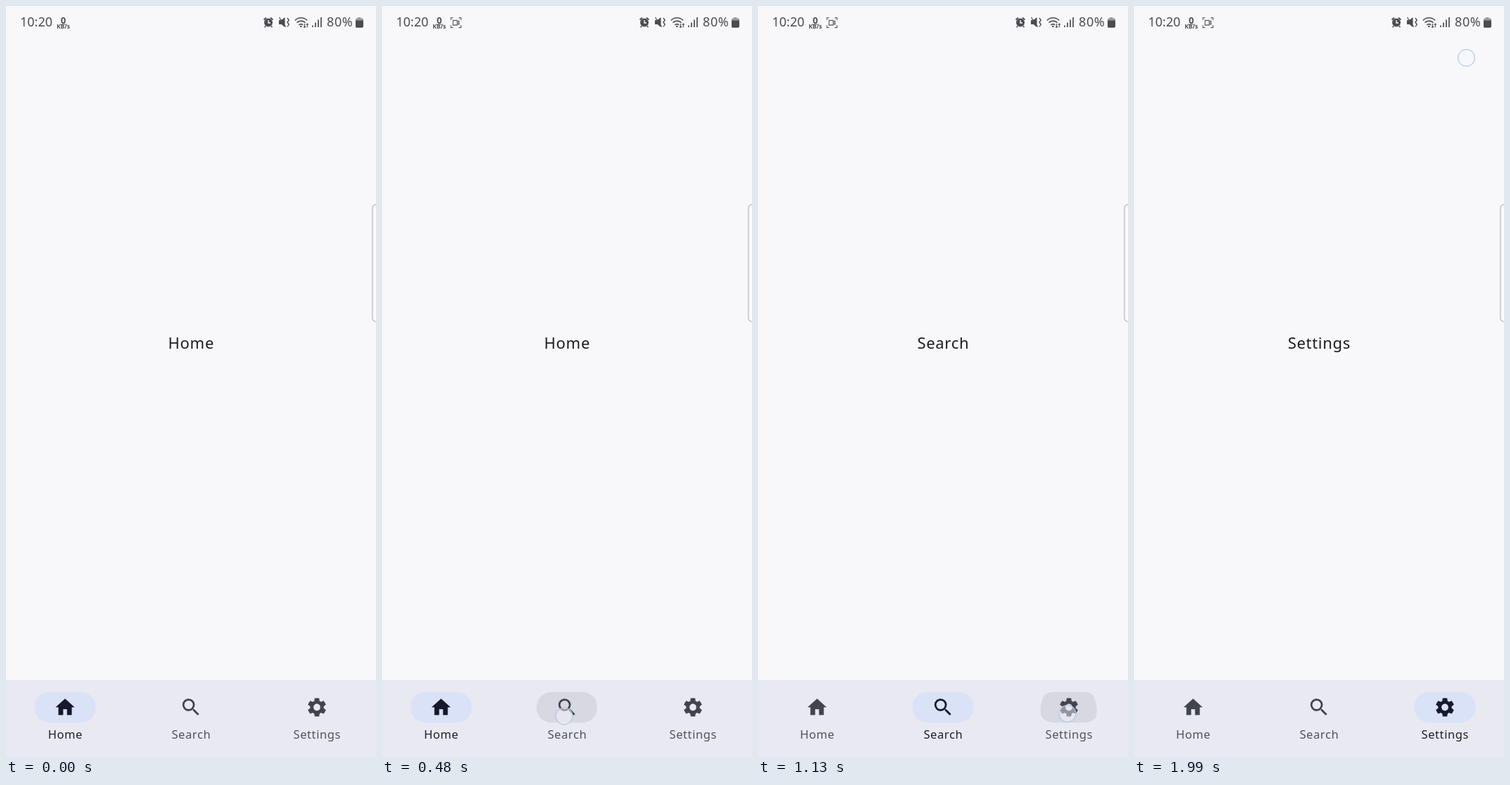
Recreate the animation shown at these times as an HTML page. Size 526 by 1065 pixels, loop 2.47 s.

```html
<!DOCTYPE html>
<html lang="en">
<head>
<meta charset="utf-8">
<title>Bottom navigation</title>
<style>
  html, body { margin: 0; width: 100%; height: 100%; overflow: hidden; background: #f8f8fb; }
  svg { display: block; width: 100vw; height: 100vh; }
  text { font-family: "Noto Sans", "Open Sans", sans-serif; }
  .title { font-size: 22px; letter-spacing: .7px; text-anchor: middle; fill: #1b1b21; }
  .label { font-size: 16.5px; font-weight: 500; letter-spacing: .6px; text-anchor: middle; }
  .status { fill: #4b4b53; }
  .line { fill: none; stroke: #4b4b53; }
</style>
</head>
<body>
<svg viewBox="0 0 526 1065">
  <defs>
    <path id="home" d="M10 20v-6h4v6h5v-8h3L12 3 2 12h3v8z"/>
    <g id="search">
      <circle cx="9.5" cy="9.5" r="5.5" fill="none" stroke="currentColor" stroke-width="2"/>
      <path d="M15.5 14h-.8l-1-1-.8.8 1.1 1v.7l5 5 1.5-1.5z"/>
    </g>
    <path id="tooth" d="M-1.9 -9.6H1.9Q2.3 -9.6 2.4 -9.2L2.8 -6.6H-2.8L-2.4 -9.2Q-2.3 -9.6 -1.9 -9.6z"/>
    <g id="settings" transform="translate(12 12)">
      <circle r="5.4" fill="none" stroke="currentColor" stroke-width="3.6"/>
    </g>
  </defs>
  <rect width="526" height="1065" fill="#f8f8fb"/>

  <g class="status">
    <text x="20" y="29" font-size="18">10:20</text>
    <text x="81.5" y="25" font-size="13" font-weight="700" text-anchor="middle">0</text>
    <path class="line" d="M77 26h9.5" stroke-width=".8"/>
    <text x="81.5" y="32.3" font-size="8.5" font-weight="700" text-anchor="middle">KB/s</text>
    <g id="rec" fill="none" stroke="#686870" stroke-width="1.3">
      <path d="M98 20v-3.3h3.3M109 16.7h3.3V20M112.3 27.3v3.3H109M101.3 30.6H98v-3.3"/>
      <path d="M101 20.5h6v6.5h-6zM107 23l2.5-1.5v4.5L107 24.5"/>
    </g>
    <circle cx="373" cy="23.5" r="6"/>
    <path class="line" d="M366.5 19.5l3.5-3M379.5 19.5l-3.5-3M369 28.5l-1.5 1.7M377 28.5l1.5 1.7" stroke-width="1.7"/>
    <path d="M373 20v4h3" fill="none" stroke="#f8f8fb" stroke-width="1.4"/>
    <path d="M388 20h3.5l5-4v14l-5-4H388z"/>
    <path class="line" d="M388.5 16l9 13.5" stroke-width="1.3"/>
    <path class="line" d="M400 17l2.2 3-2.2 3 2.2 3-2.2 3.5" stroke-width="1.4"/>
    <path class="line" d="M411 20.3a12 12 0 0 1 17 0M413.5 23.7a8.5 8.5 0 0 1 12 0M416.3 26.8a4.6 4.6 0 0 1 6 0" stroke-width="1.7"/>
    <circle cx="419.3" cy="29" r="1.3"/>
    <path class="line" d="M424.5 25v5.5M423 28.8l1.5 1.7 1.5-1.7M428.3 30.5V25M426.8 26.7l1.5-1.7 1.5 1.7" stroke-width="1.1"/>
    <path class="line" d="M436 27.5V30M440 23.5V30M444 19.5V30M448 16V30" stroke-width="1.7"/>
    <text x="456" y="29" font-size="18" letter-spacing=".6">80%</text>
    <path d="M500 16h4.5v1.5h2q1.5 0 1.5 1.5v2.5H497V19q0-1.5 1.5-1.5h1.5z" fill="#9a9aa2"/>
    <path d="M497 20.5h11V29q0 1.7-1.7 1.7h-7.6q-1.7 0-1.7-1.7z"/>
  </g>

  <rect x="521" y="281.5" width="20" height="166" rx="5" fill="#fbfbfd" stroke="#c3c2cf" stroke-width="1.5"/>
  <text class="title" id="title" x="263.3" y="486"></text>

  <rect y="956" width="526" height="109" fill="#e8e9f1"/>
  <g id="nav"></g>
  <circle id="touch" r="11.8" fill="#f6f9ff" fill-opacity=".45" stroke="#b4c8e6" stroke-width="1.3"/>
</svg>
<script>
const NS = "http://www.w3.org/2000/svg";
const LOOP = 2470, PILL_W = 87, PILL_H = 43.5, MID_Y = 994.5, ICON = 1.36;
const STEPS = [0, 50, 110, 160, 220, 270, 330, 380, 430, 490, 540, 590,
  1020, 1080, 1130, 1190, 1240, 1290, 1350, 1400, 1460, 1510, 1990];
const TABS = [["Home", 84], ["Search", 263], ["Settings", 442]];
// tap: tab, touch point, finger down, ripple start, selection, finger up
const TAPS = [
  { tab: 1, x: 259, y: 1007, down: 310, ripple: 320, select: 455, up: 500 },
  { tab: 2, x: 440, y: 1003.5, down: 1010, ripple: 1040, select: 1190, up: 1290 }
];
const byId = id => document.getElementById(id);
const clamp = v => Math.max(0, Math.min(1, v));
const ramp = (t, start, length) => clamp((t - start) / length);
const mix = (a, b, k) => a + (b - a) * k;
const mixColor = (a, b, k) => `rgb(${a.map((v, i) => Math.round(mix(v, b[i], k)))})`;

function add(parent, tag, attrs) {
  const el = document.createElementNS(NS, tag);
  set(el, attrs);
  parent.appendChild(el);
  return el;
}
function set(el, attrs) {
  for (const key in attrs) el.setAttribute(key, attrs[key]);
}

// cubic-bezier(.4, 0, .2, 1), solved by bisection
function ease(x) {
  let lo = 0, hi = 1;
  for (let i = 0; i < 20; i++) {
    const s = (lo + hi) / 2, r = 1 - s;
    if (1.2 * r * r * s + .6 * r * s * s + s ** 3 < x) lo = s; else hi = s;
  }
  return lo * lo * (3 - 2 * lo);
}

for (let i = 0; i < 6; i++)
  add(byId("settings"), "use", { href: "#tooth", transform: `rotate(${i * 60})` });

const nav = byId("nav");
const tabs = TABS.map(([name, x]) => {
  const top = MID_Y - PILL_H / 2;
  const clip = add(nav, "clipPath", { id: "clip" + name });
  add(clip, "rect", { x: x - PILL_W / 2, y: top, width: PILL_W, height: PILL_H, rx: PILL_H / 2 });
  const pill = add(nav, "rect", { y: top, height: PILL_H, rx: PILL_H / 2, fill: "#dae2f8" });
  const ripple = add(add(nav, "g", { "clip-path": `url(#clip${name})` }), "circle", { fill: "#44464f" });
  const icon = add(nav, "use", {
    href: "#" + name.toLowerCase(),
    transform: `translate(${x - 12 * ICON} ${MID_Y - 12 * ICON}) scale(${ICON})`,
    fill: "currentColor"
  });
  const label = add(nav, "text", { class: "label", x: x + .3, y: 1039 });
  label.textContent = name;
  return { x, pill, ripple, icon, label };
});

function selection(i, t) {
  const [a, b] = TAPS.map(tap => ease(ramp(t, tap.select, 100)));
  return [1 - a, a * (1 - b), b][i];
}

function drawTab(tab, i, t) {
  const k = selection(i, t), width = PILL_W * k;
  set(tab.pill, { x: tab.x - width / 2, width, opacity: k });
  set(tab.icon, { color: mixColor([66, 68, 77], [21, 25, 43], k) });
  set(tab.label, { fill: mixColor([80, 81, 91], [30, 31, 40], k) });

  const tap = TAPS.find(p => p.tab === i);
  if (!tap) return set(tab.ripple, { opacity: 0 });
  const grow = ease(ramp(t, tap.ripple, 225));
  set(tab.ripple, {
    cx: mix(tap.x + 1, tab.x, grow),
    cy: mix(tap.y, MID_Y, grow),
    r: mix(26, 49, grow),
    opacity: .1 * ramp(t, tap.ripple, 60) * (1 - ramp(t, tap.select, 50))
  });
}

function drawTouch(t) {
  const tap = TAPS.find(p => t >= p.down && t < p.up + 60);
  const touch = byId("touch");
  if (tap) set(touch, { cx: tap.x, cy: tap.y, opacity: 1 - ramp(t, tap.up, 60) });
  else set(touch, { cx: 472.5, cy: 73.5, opacity: t >= 1990 ? 1 : 0 });
}

function draw(now) {
  const time = now % LOOP;
  const t = STEPS.filter(s => s <= time).pop();
  const current = TAPS.filter(p => t >= p.select).length;
  byId("title").textContent = TABS[current][0];
  byId("rec").setAttribute("opacity", ramp(t, 50, 250));
  tabs.forEach((tab, i) => drawTab(tab, i, t));
  drawTouch(t);
}

const start = performance.now();
function tick() {
  draw(performance.now() - start);
  requestAnimationFrame(tick);
}
tick();
</script>
</body>
</html>
```
